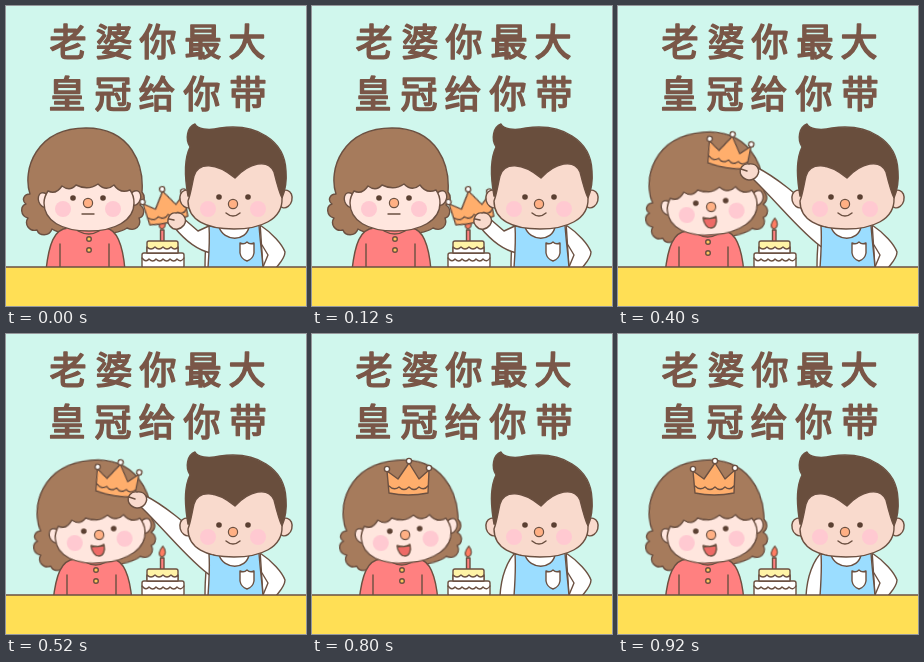
An HTML page that plays this animation: 300 px wide and 300 px high, repeating every 1 s.

```html
<!DOCTYPE html>
<html lang="zh">
<head>
<meta charset="utf-8">
<style>
html, body { margin: 0; width: 100%; height: 100%; overflow: hidden; background: #d0f7ed; }
svg { display: block; width: 100vw; height: 100vh; }
.ink { stroke: #6b5041; stroke-width: 1.4; stroke-linejoin: round; stroke-linecap: round; }
.line { fill: none; }
.skin { fill: #ffe6de; }
.tan { fill: #f9dacd; }
.hair { fill: #a67b5c; }
.dark { fill: #694e3d; }
.white { fill: #fff; }
.coral { fill: #ff8080; }
.blue { fill: #9bddff; }
.yellow { fill: #fff3a6; }
.gold { fill: #ffc35c; }
.orange { fill: #ffae6c; }
.nose { fill: #ffb084; stroke-width: 1.2; }
.cheek { fill: #ffc9d1; }
.eye { fill: #5b4032; }
text {
  font: 400 37px "Noto Sans CJK SC", "Noto Sans CJK", sans-serif;
  fill: #7a5748; stroke: #7a5748; stroke-width: 1.7; stroke-linejoin: round; text-anchor: middle;
}

/* Each pose is held for one fifth of the loop. */
.pose { visibility: hidden; animation: pose 1s step-end infinite; }
.p1 { animation-delay: -.8s; }
.p2 { animation-delay: -.6s; }
.p3 { animation-delay: -.4s; }
.p4 { animation-delay: -.2s; }
@keyframes pose { 0% { visibility: visible; } 20%, 100% { visibility: hidden; } }

.happy { animation: happy 1s step-end infinite; }
@keyframes happy { 0% { visibility: hidden; } 20%, 100% { visibility: visible; } }

.head { transform-origin: 81px 195px; animation: head 1s step-end infinite; }
@keyframes head {
  0% { transform: none; }
  20%, 100% { transform: translate(11px, 4px) rotate(-5deg); }
}
.body { animation: body 1s step-end infinite; }
@keyframes body {
  0% { transform: none; }
  20%, 100% { transform: translate(7px, 3px); }
}
.flame { transform-origin: 156px 224px; animation: flame 1s step-end infinite; }
@keyframes flame {
  0%, 40%, 80%, 100% { transform: scale(.85); }
  20%, 60% { transform: none; }
}
.crown { animation: crown 1s step-end infinite; }
@keyframes crown {
  0% { transform: translate(159px, 200px) rotate(-13deg); }
  20% { transform: translate(149px, 174px) rotate(-13deg); }
  40% { transform: translate(111px, 145px) rotate(9deg); }
  60% { transform: translate(102px, 145px) rotate(4deg); }
  80%, 100% { transform: translate(96px, 144px) rotate(0deg); }
}
</style>
</head>
<body>
<svg viewBox="0 0 300 300" preserveAspectRatio="none">
  <rect width="300" height="300" fill="#d0f7ed"/>
  <text x="62 108 152 197 241" y="50">老婆你最大</text>
  <text x="61 107 151 196 242" y="102">皇冠给你带</text>

  <!-- woman -->
  <g class="head">
    <path class="ink hair" d="M24 188C16 164 30 122 80 122C126 122 138 160 136 186C140 191 138 197 134 199C140 203 138 211 133 212C136 220 129 226 121 222C110 230 60 232 46 223C43 231 33 230 31 224C23 226 18 218 22 212C14 210 14 200 20 198C15 194 18 188 24 188Z"/>
  </g>
  <g class="body">
    <path class="ink coral" d="M62 222C48 223 43 238 40 264H119C117 240 112 224 100 222Z"/>
    <path class="ink line" d="M54 238V262M103 238V262M72 225Q83 231 93 225"/>
    <g class="ink gold">
      <circle cx="83" cy="233" r="2.3"/><circle cx="83" cy="244" r="2.3"/>
    </g>
  </g>
  <g class="head">
    <ellipse class="ink skin" cx="38" cy="194" rx="5.5" ry="7.5" transform="rotate(-20 38 194)"/>
    <ellipse class="ink skin" cx="129" cy="192" rx="5.5" ry="7.5" transform="rotate(20 129 192)"/>
    <path class="ink skin" d="M38 197C38 193 40 188 42 185Q50 189 56 180Q64 186 70 179Q82 185 92 178Q100 186 108 179Q114 188 124 184C127 188 128 192 128 197C128 215 108 225 83 225C56 225 38 215 38 197Z"/>
    <circle class="cheek" cx="57" cy="203" r="8"/><circle class="cheek" cx="107" cy="203" r="8"/>
    <circle class="eye" cx="67" cy="192" r="2.8"/><circle class="eye" cx="97" cy="192" r="2.8"/>
    <circle class="ink nose" cx="82" cy="197" r="4.6"/>
    <path class="pose p0 ink line" d="M76 208H88"/>
    <path class="happy ink" fill="#ee6a66" d="M73 207Q80 210 86 207C87 214 84 218 80 218C76 218 73 213 73 207Z"/>
  </g>

  <!-- cake -->
  <g class="ink">
    <path class="coral" d="M154.500 224H158V236H154.500Z"/>
    <path class="flame" fill="#ff7c62" d="M156 223C151 221 152 216 157 210C161 215 161 221 156 223Z"/>
    <rect class="white" x="136" y="247" width="42" height="15" rx="2"/>
    <path class="line" d="M136 252Q140 257 143 253Q147 257 150 253Q154 257 157 253Q161 257 164 253Q168 257 171 253Q175 257 178 252"/>
    <rect class="yellow" x="141" y="235" width="31" height="12" rx="2"/>
    <path class="white" d="M141 247V241Q145 245 149 241Q153 245 157 241Q161 245 165 241Q169 245 172 241V247Z"/>
  </g>

  <!-- crown -->
  <g class="crown">
    <path class="ink orange" d="M-19 15L-21 -7L-10 1L1 -15L11 1L21 -8L20 15Q0 19 -19 15Z"/>
    <path class="ink line" d="M-19 8Q-14 13 -9 9Q-4 14 1 9Q6 14 11 9Q16 13 20 8"/>
    <g class="ink white">
      <circle cx="-21" cy="-9" r="2.6"/><circle cx="1" cy="-17" r="2.6"/><circle cx="21" cy="-10" r="2.6"/>
    </g>
  </g>

  <!-- man -->
  <path class="ink white" d="M254 219C266 227 276 238 279 246C279 252 274 257 270 262H254Z"/>
  <path class="ink line" d="M256 239L262 249L257 261"/>
  <path class="ink white" d="M204 216C200 228 199 246 199 262H257L254 216Z"/>
  <g class="ink">
    <g class="pose p0">
      <path class="white" d="M177 212L192 225L205 219V247C195 245 182 238 168 221Z"/>
      <path class="tan" d="M164 220C159 214 164 206 170 207C177 206 182 213 178 219C174 224 168 225 164 220ZM163 213L168 214"/>
    </g>
    <g class="pose p1">
      <path class="white" d="M167 184C173 196 186 208 204 217V242C187 239 172 218 160 193Z"/>
      <path class="tan" d="M151 192C147 186 153 180 159 182C167 180 171 187 167 193C162 198 155 198 151 192ZM151 186L157 188"/>
    </g>
    <g class="pose p2">
      <path class="white" d="M138 161C160 172 180 190 205 212V242C184 228 160 197 135 173Z"/>
      <path class="tan" d="M123 169C120 162 126 157 131 158C139 157 143 164 139 170C134 176 127 175 123 169ZM123 163L129 165"/>
    </g>
    <g class="pose p3">
      <path class="white" d="M167 186C173 197 186 209 204 217V242C188 238 172 218 160 195Z"/>
      <path class="tan" d="M151 191C147 184 152 178 158 180C166 177 171 185 168 191C164 198 155 198 151 191ZM155 182V188M160 181V187"/>
    </g>
    <path class="pose p4 white" d="M205 217C195 226 189 243 188 262H206V240"/>
  </g>
  <path class="ink blue" d="M203 220C204 234 203 248 202 262H257C256 248 254 234 253 219L243 221C240 236 218 236 213 221Z"/>
  <path class="ink white" d="M234 237Q238 239 241 236Q244 239 248 237V247Q247 253 241 255Q235 253 234 247Z"/>
  <ellipse class="ink tan" cx="181" cy="193" rx="7" ry="9" transform="rotate(-15 181 193)"/>
  <ellipse class="ink tan" cx="279" cy="193" rx="7" ry="9" transform="rotate(15 279 193)"/>
  <path class="ink dark" d="M182 190C178 168 179 151 184 141C179 133 181 121 189 118C191 123 202 125 214 122C250 117 279 134 280 165C281 177 279 185 276 192Z"/>
  <path class="ink tan" d="M182 195C185 187 186 178 188 170C192 156 210 156 229 172C243 157 262 152 268 166C271 178 273 186 276 192C277 214 254 223 228 223C200 223 182 214 182 195Z"/>
  <circle class="cheek" cx="202" cy="203" r="8"/><circle class="cheek" cx="252" cy="203" r="8"/>
  <circle class="eye" cx="213" cy="191" r="2.8"/><circle class="eye" cx="242" cy="191" r="2.8"/>
  <circle class="ink nose" cx="227" cy="198" r="4.6"/>
  <path class="ink line" d="M220 207Q227 213 234 207"/>

  <!-- table -->
  <rect y="261" width="300" height="39" fill="#ffdf55"/>
  <path class="ink line" d="M-2 261H302"/>
</svg>
</body>
</html>
```
